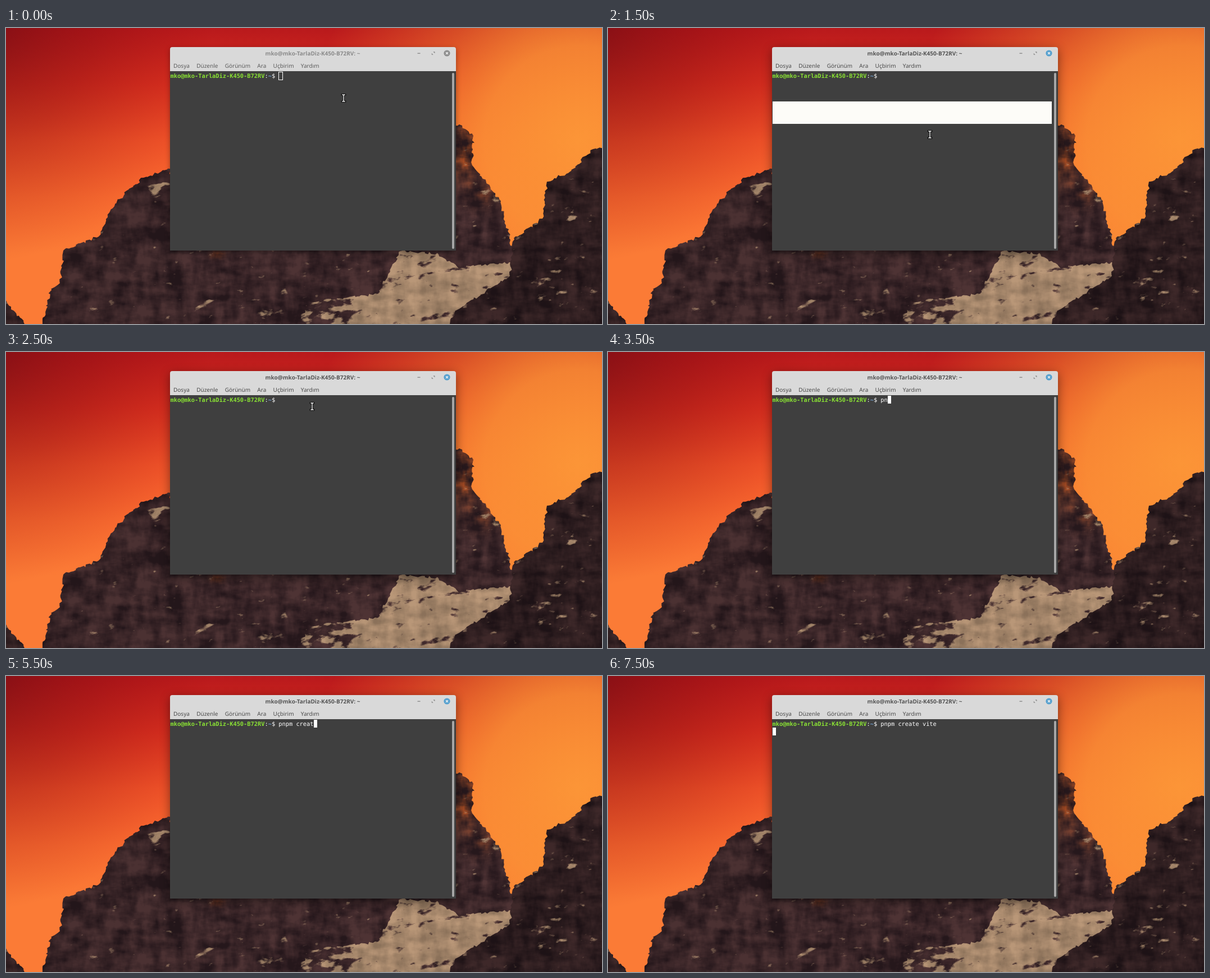
An HTML page with a canvas that plays this animation: 1061x528 px, repeating every 8000 ms.

```html
<!DOCTYPE html>
<html lang="tr">
<head>
<meta charset="utf-8">
<title>Terminal</title>
<style>
  html, body { margin: 0; width: 100%; height: 100%; overflow: hidden; background: #d8381f; }
  #stage { position: relative; width: 1061px; height: 528px; overflow: hidden; text-rendering: geometricPrecision; }
  #stage * { position: absolute; }
  .text { white-space: pre; line-height: 14px; }
  #window {
    left: 292px; top: 34px; width: 509px; height: 363px;
    border-radius: 4px 4px 0 0; background: #d9d9d9;
    box-shadow: 0 3px 10px rgba(0,0,0,.35);
  }
  #window.focus { box-shadow: 0 5px 18px rgba(0,0,0,.45); }
  #title {
    left: 0; width: 508px; top: 4px; text-align: center; color: #8b8b8b;
    font: bold 10px/14px "Noto Sans", "Open Sans", sans-serif;
  }
  .focus #title { color: #555; }
  .menu { top: 26px; color: #5c5c5c; font: 10px/14px "Noto Sans", "Open Sans", sans-serif; }
  .focus .menu { color: #4a4a4a; }
  #buttons { left: 434px; top: 3px; }
  #close { fill: #8e8e8e; }
  .focus #close { fill: #55a0cf; }
  #screen { left: 0; top: 43px; width: 509px; height: 320px; background: #3f3f3f; }
  #screen .text { top: 2px; font: 10.33px/14px "DejaVu Sans Mono", "Noto Sans Mono", monospace; color: #fff; }
  #screen .bold { font-weight: bold; color: #8ae234; }
  #screen .path { font-weight: bold; color: #729fcf; }
  #bar { left: 502px; top: 3px; width: 4px; height: 314px; border-radius: 2px; background: #a6a6a6; }
  #band { left: 1px; top: 54px; width: 497px; height: 40px; background: #fdfcf8; }
  #caret { width: 6.3px; height: 14px; background: #fff; }
  #caret.hollow { box-sizing: border-box; width: 8px; height: 15px; background: none; border: 1px solid #fff; }
  #pointer { left: 0; top: 0; overflow: visible; fill: none; }
</style>
</head>
<body>
<div id="stage">
  <canvas id="wall" width="1061" height="528"></canvas>
  <div id="window">
    <div id="title" class="text"></div>
    <svg id="buttons" width="70" height="16">
      <path d="M6.5 8.2h5" stroke="#858585" stroke-width="1.3"/>
      <path d="M35 5.6h2.2v2.2zM32 8.4v2.2h2.2z" fill="#858585" stroke="#858585" stroke-width=".5"/>
      <circle id="close" cx="59" cy="8" r="5.6"/>
      <path d="M57 6l4 4m0-4l-4 4" stroke="#f4f4f4" stroke-width="1.2"/>
    </svg>
    <div id="screen">
      <div id="bar"></div>
      <div id="band"></div>
      <div id="caret"></div>
    </div>
  </div>
  <svg id="pointer" width="1" height="1">
    <defs><path id="beam" d="M-2.6-6H-1L0-5.2L1-6H2.6M0-5.2V5.2M-2.6 6H-1L0 5.2L1 6H2.6"/></defs>
    <use href="#beam" stroke="#111" stroke-width="3.4" stroke-linecap="square"/>
    <use href="#beam" stroke="#fff" stroke-width="1.3"/>
  </svg>
</div>
<script>
const W = 1061, H = 528;
const $ = id => document.getElementById(id);
const clamp = v => Math.max(0, Math.min(1, v));
const mix = (a, b, k) => a + (b - a) * k;

// ---- value noise ----
function hash(x, y) {
  let h = Math.imul(x, 374761393) ^ Math.imul(y, 668265263);
  h = Math.imul(h ^ (h >>> 13), 1274126177);
  return ((h ^ (h >>> 16)) >>> 0) / 4294967296;
}

function noise(x, y) {
  const i = Math.floor(x), j = Math.floor(y);
  const ease = t => t * t * (3 - 2 * t);
  const u = ease(x - i), v = ease(y - j);
  return mix(mix(hash(i, j), hash(i + 1, j), u), mix(hash(i, j + 1), hash(i + 1, j + 1), u), v);
}

// Each octave is turned so the lattice does not show
function fbm(x, y) {
  let sum = 0, amp = .5;
  for (let o = 0; o < 4; o++, amp /= 2) {
    sum += amp * noise(x, y);
    [x, y] = [1.7 * x + 1.1 * y + 17, 1.7 * y - 1.1 * x + 31];
  }
  return sum / .9375;
}

// ---- wallpaper ----
function wash(ctx, gradient, stops) {
  stops.forEach(([at, color]) => gradient.addColorStop(at, color));
  ctx.fillStyle = gradient;
  ctx.fillRect(0, 0, W, H);
}

function paintSky(ctx) {
  const glow = (x, y, r) => ctx.createRadialGradient(x, y, 0, x, y, r);
  wash(ctx, ctx.createLinearGradient(0, 0, 0, 400), [
    [0, "#b9191c"], [.25, "#d93020"], [.5, "#f05329"], [.75, "#f96b30"], [1, "#fb7b36"]
  ]);
  wash(ctx, glow(1020, 200, 480), [
    [0, "#fc9537"], [.35, "rgba(251,146,54,.85)"], [.6, "rgba(250,140,50,.45)"], [1, "rgba(245,120,45,0)"]
  ]);
  wash(ctx, glow(-60, -10, 430), [
    [0, "rgba(90,8,16,.62)"], [.5, "rgba(125,8,14,.36)"], [1, "rgba(150,10,10,0)"]
  ]);
}

// Broken outline through a few key points
function crag(ctx, bright, field, pts) {
  ctx.fillStyle = `rgb(${bright},${field},0)`;
  ctx.beginPath();
  pts.forEach(([x, y], i) => {
    const [nx, ny] = pts[(i + 1) % pts.length];
    const steps = Math.ceil(Math.hypot(nx - x, ny - y) / 4);
    for (let s = 0; s < steps; s++) {
      const k = s / steps, amp = s ? 5 : 0;
      ctx.lineTo(mix(x, nx, k) + amp * (hash(i, s) - .5), mix(y, ny, k) + amp * (hash(s, i + 99) - .5));
    }
  });
  ctx.fill();
}

// Red holds the brightness, green marks the snow field
function paintMask(ctx) {
  crag(ctx, 112, 0, [[790, 172], [812, 174], [832, 192], [830, 245], [878, 305], [898, 378], [915, 540], [780, 540]]);
  crag(ctx, 108, 0, [[280, 388], [905, 388], [905, 540], [280, 540]]);
  crag(ctx, 108, 255, [[702, 398], [770, 403], [805, 428], [905, 418], [905, 540], [520, 540], [536, 490], [662, 474]]);
  crag(ctx, 104, 0, [
    [62, 540], [80, 465], [96, 455], [104, 395], [165, 372], [186, 325], [215, 290], [245, 267], [292, 251], [330, 540]
  ]);
  crag(ctx, 86, 0, [
    [785, 540], [800, 504], [897, 442], [904, 375], [955, 340], [963, 274], [1003, 257], [1045, 216], [1070, 210], [1070, 540]
  ]);
  crag(ctx, 86, 0, [[-5, 484], [9, 497], [36, 532], [-5, 540]]);
}

const spot = (x, y, cx, cy, rx, ry) => Math.exp(-(((x - cx) / rx) ** 2) - ((y - cy) / ry) ** 2);

function snowAt(x, y) {
  return spot(x, y, 268, 285, 26, 18) + spot(x, y, 1000, 338, 22, 15) + spot(x, y, 955, 455, 30, 17)
    + .7 * spot(x, y, 865, 300, 25, 14) + .7 * spot(x, y, 335, 492, 45, 8) + .5 * spot(x, y, 510, 500, 90, 25);
}

const heatAt = (x, y) => .7 * spot(x, y, 818, 215, 24, 48) + .3 * spot(x, y, 848, 295, 26, 24) + .6 * spot(x, y, 375, 403, 11, 8);

function paintRocks(ctx) {
  const layer = document.createElement("canvas");
  layer.width = W;
  layer.height = H;
  const m = layer.getContext("2d", { willReadFrequently: true });
  paintMask(m);

  const img = m.getImageData(0, 0, W, H), px = img.data;
  const dark = [34, 21, 25], light = [72, 47, 48], snow = [178, 145, 115], warm = [195, 84, 30];
  for (let y = 165; y < H; y++) {
    for (let x = 0; x < W; x++) {
      const p = (y * W + x) * 4;
      const covered = y < 395 && x > 294 && x < 798;
      if (!px[p + 3] || covered) continue;
      const bright = px[p] / 100, field = px[p + 1] / 255;
      const tone = clamp((.5 * fbm(x / 14, y / 34) + .5 * fbm(x / 30, y / 12) - .5) * 2.6 + .5);
      const drift = fbm(x / 19 + 60, (y + x * .15) / 10);
      const bare = clamp((drift - .76 + .3 * snowAt(x, y)) * 7);
      // The field breaks up into rock towards its lower left end
      const full = clamp((drift - .2 - .25 * clamp((720 - x) / 150)) * 7);
      const cover = mix(bare, full, field);
      const heat = clamp(heatAt(x, y) * tone * 1.5);
      for (let c = 0; c < 3; c++) {
        const rock = mix(bright * mix(dark[c], light[c], tone), warm[c] * (.35 + .7 * tone), heat);
        px[p + c] = mix(rock, snow[c] * (.78 + .26 * tone), cover);
      }
    }
  }
  m.putImageData(img, 0, 0);
  ctx.drawImage(layer, 0, 0);
}

// ---- window ----
const HOST = "mko@mko-TarlaDiz-K450-B72RV";
const COMMAND = "pnpm create vite";
const CELL = 6.22, LEFT = .5, ROW = 14, START = HOST.length + 4;
const column = n => LEFT + n * CELL;

function addText(parent, text, x, cls) {
  const el = document.createElement("div");
  el.className = "text " + cls;
  el.textContent = text;
  el.style.left = x + "px";
  parent.append(el);
  return el;
}

$("title").textContent = HOST + ": ~";
const GAP = 12.3;
let menuX = 6;
for (const label of ["Dosya", "Düzenle", "Görünüm", "Ara", "Uçbirim", "Yardım"]) {
  menuX += addText($("window"), label, menuX, "menu").getBoundingClientRect().width + GAP;
}
addText($("screen"), HOST, column(0), "bold");
addText($("screen"), ":", column(HOST.length), "");
addText($("screen"), "~", column(HOST.length + 1), "path");
addText($("screen"), "$", column(HOST.length + 2), "");
const typed = addText($("screen"), "", column(START), "");

const ctx = $("wall").getContext("2d");
paintSky(ctx);
paintRocks(ctx);

// ---- playback: one state per half second ----
const STEP = 500, LOOP = 8000, TYPING = 7, ENTER = 15;
const keys = [2, 3, 6, 8, 10, 12, 13, 16];
const path = [[601, 125], [601, 125], [574, 190], [573, 190], [553, 117], [545, 97], [545, 97]];
const show = (el, on) => { el.style.visibility = on ? "visible" : "hidden"; };
let last = -1;

function draw(step) {
  const focus = step >= 2, entered = step >= ENTER;
  const count = entered ? COMMAND.length : keys[step - TYPING] || 0;
  $("window").className = focus ? "focus" : "";
  typed.textContent = COMMAND.slice(0, count);
  show($("band"), step >= 2 && step <= 4);

  const caret = $("caret");
  caret.className = focus ? "" : "hollow";
  caret.style.left = (entered ? LEFT : column(START + count)) + "px";
  caret.style.top = 1 + (entered ? ROW : 0) + "px";
  show(caret, step !== 3 && step !== 5);

  const at = path[step];
  show($("pointer"), !!at);
  if (at) $("pointer").style.transform = `translate(${at[0]}px, ${at[1]}px)`;
}

const begin = performance.now();
function tick() {
  const step = Math.floor((performance.now() - begin) % LOOP / STEP);
  if (step !== last) draw(last = step);
  requestAnimationFrame(tick);
}
tick();
</script>
</body>
</html>
```
